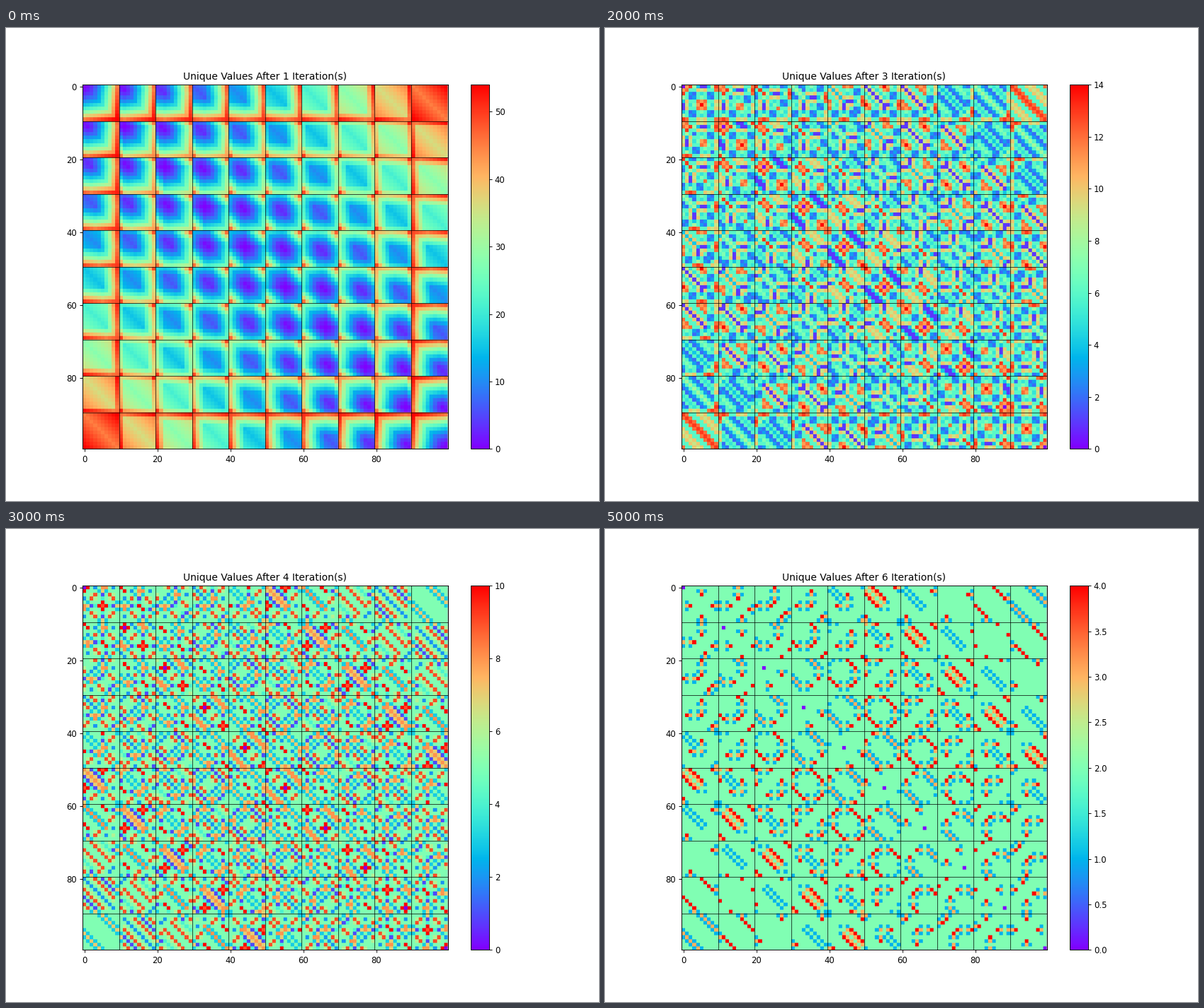
Recreate the animation shown at these times as a matplotlib script. Size 837 by 669 pixels, loop 6 s.

```python
import matplotlib.pyplot as plt
import numpy as np
from matplotlib.animation import FuncAnimation

WIDTH, HEIGHT = 837, 669
DPI = 83.5
STEPS = 6
SHEET = (800, 1000)                 # rows, columns of the fine cell sheet
TOP, LEFT, SIDE = 96, 129, 616      # where the grid lies on the sheet


def kaprekar(n):
    """Digits in falling order minus digits in rising order, four digits."""
    digits = np.sort([n // 10**p % 10 for p in range(4)], axis=0)
    up = np.array([1000, 100, 10, 1])
    return up[::-1] @ digits - up @ digits


def rank_grids():
    n = np.arange(10000)
    grids = []
    for _ in range(STEPS):
        n = kaprekar(n)
        rank = np.searchsorted(np.unique(n), n)
        grids.append(rank.reshape(100, 100))
    return grids


def on_sheet(grid):
    """Enlarge the grid to SIDE cells and place it on an empty sheet."""
    pick = ((np.arange(SIDE) + 0.5) * 100 / SIDE).astype(int)
    sheet = np.full(SHEET, np.nan)
    sheet[TOP:TOP + SIDE, LEFT:LEFT + SIDE] = grid[np.ix_(pick, pick)]
    return np.ma.masked_invalid(sheet)


grids = rank_grids()

# the tiny surplus keeps the pixel count from rounding down
fig, ax = plt.subplots(
    figsize=((WIDTH + 0.002) / DPI, (HEIGHT + 0.002) / DPI), dpi=DPI)

# the sheet fills the figure, so its cells are smoothed without any shift
back = fig.add_axes([0, 0, 0.99999, 0.99999], zorder=-1)
back.axis("off")
image = back.imshow(on_sheet(grids[0]), cmap="rainbow", aspect="auto",
                    interpolation="catrom", interpolation_stage="rgba")

ax.patch.set_visible(False)
ax.set(xlim=(-0.5, 99.5), ylim=(99.5, -0.5))
ax.set_aspect(HEIGHT / SHEET[0] * SHEET[1] / WIDTH)
fig.colorbar(image, ax=ax)
title = ax.set_title("")

for edge in np.arange(9.5, 99, 10):
    ax.axhline(edge, color="black", linewidth=0.6)
    ax.axvline(edge, color="black", linewidth=0.6)


def update(i):
    image.set_data(on_sheet(grids[i]))
    image.set_clim(0, grids[i].max())
    title.set_text(f"Unique Values After {i + 1} Iteration(s)")
    return image, title


anim = FuncAnimation(fig, update, frames=STEPS, interval=1000,
                     repeat=True, repeat_delay=0, blit=False)
plt.show()
```
